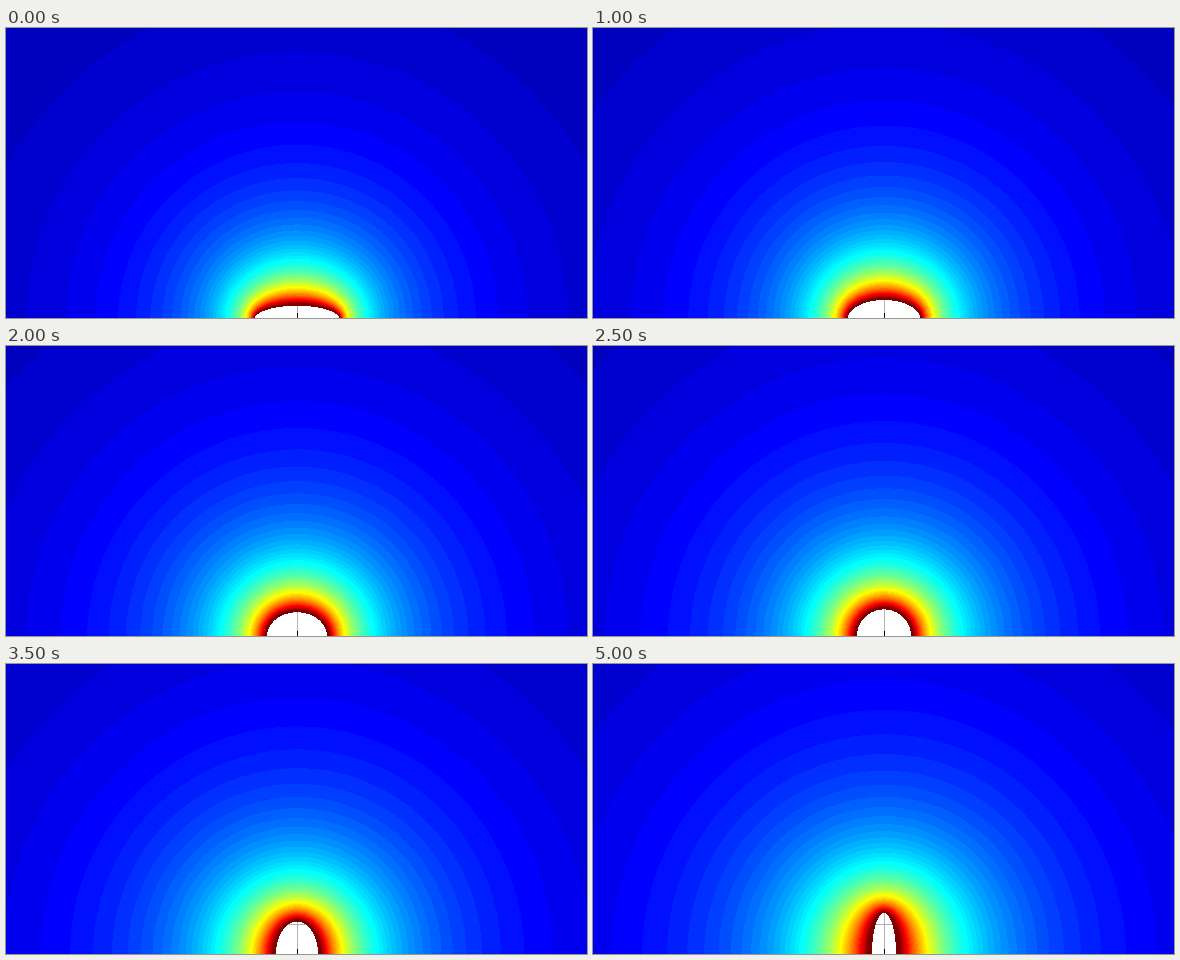
A matplotlib script that plays this animation: 581x290 px, repeating every 5500 ms.

```python
import numpy as np
import matplotlib.pyplot as plt
from matplotlib.animation import FuncAnimation

W, H, DPI = 581, 290, 100
FRAMES, INTERVAL = 11, 500
CX, CY = 291.0, 291.0
COLORS = 64
V_MIN = 0.00044      # potential of the lowest colour
SPAN = 69.5          # colour steps from zero to the surface potential


def jet(n):
    t = 4 * np.arange(1, n + 1) / n
    return np.stack([np.clip(1.5 - abs(t - k), 0, 1) for k in (3, 2, 1)], axis=1)


PALETTE = jet(COLORS)
X, Y = np.meshgrid(np.arange(W) + 0.5 - CX, CY - np.arange(H) - 0.5)


def potential(lam, a, b):
    """Charged spheroid turned about the horizontal axis, at confocal lam."""
    c = np.sqrt(a * a - b * b + 0j)
    return np.real(np.arctanh(c / np.sqrt(a * a + lam)) / c)


def field(k):
    a, b = 42.3 - 3.02 * k, 13.2 + 2.88 * k
    A, B = a * a, b * b
    s = X**2 + Y**2 - A - B
    root = np.sqrt(np.maximum(s * s + 4 * (X**2 * B + Y**2 * A - A * B), 0))
    lam = np.maximum((s + root) / 2, 0)
    step = potential(0, a, b) / SPAN
    level = np.floor((potential(lam, a, b) - V_MIN) / step)
    rgb = PALETTE[np.clip(level, 0, COLORS - 1).astype(int)]

    # the hollow body shows the axes behind it
    body = X**2 / A + Y**2 / B < 1
    rgb[body] = 1
    grid = np.zeros_like(body)
    grid[:, 291] = True
    grid[260, :] = True
    rgb[body & grid] = 0.7
    rgb[285:, 291] = 0
    return rgb


fig = plt.figure(figsize=(W / DPI, H / DPI), dpi=DPI)
ax = fig.add_axes([0, 0, 1, 1])
ax.axis("off")
image = ax.imshow(field(0), interpolation="nearest", aspect="auto")


def update(k):
    image.set_data(field(k))
    return [image]


anim = FuncAnimation(fig, update, frames=FRAMES, interval=INTERVAL,
                     repeat=True, repeat_delay=0, blit=False)
plt.show()
```
